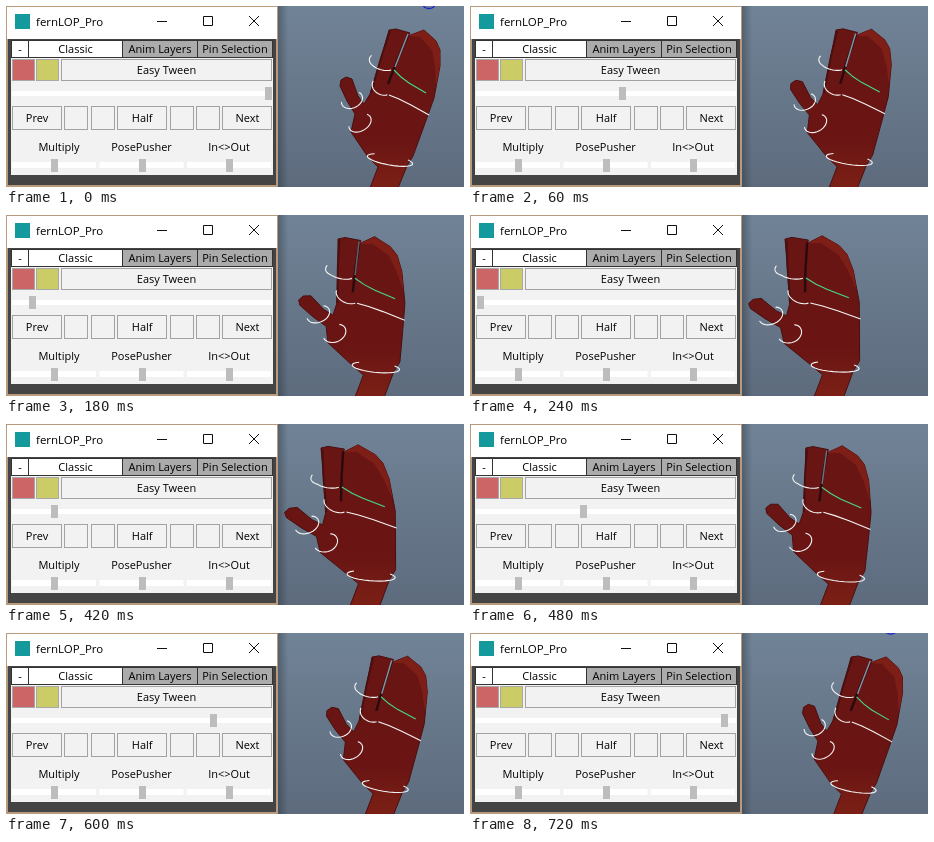
Recreate the animation shown at these times as an HTML page. Size 458x181 px, loop 780 ms.

```html
<!DOCTYPE html>
<html lang="en">
<head>
<meta charset="utf-8">
<title>Tween slider</title>
<style>
  html, body { margin: 0; width: 100%; height: 100%; overflow: hidden; }
  svg { display: block; width: 458px; height: 181px; }
  text { font: 11px "Open Sans", "Noto Sans", sans-serif; }
  .mid { text-anchor: middle; }
  .btn { fill: #f2f2f2; stroke: #a2a2a2; }
  .knob { fill: #bdbdbd; }
  .line { fill: none; stroke: #f4f4f4; stroke-width: 1.1; }
</style>
</head>
<body>
<svg viewBox="0 0 458 181">
  <defs>
    <linearGradient id="sky" x2="0" y2="1">
      <stop stop-color="#718397"/><stop offset="1" stop-color="#5d6b7d"/>
    </linearGradient>
    <linearGradient id="shade">
      <stop stop-opacity=".28"/><stop offset="1" stop-opacity="0"/>
    </linearGradient>
    <linearGradient id="red" x2="0" y2="1">
      <stop stop-color="#681514"/><stop offset=".7" stop-color="#6a1514"/><stop offset="1" stop-color="#7c2015"/>
    </linearGradient>
  </defs>
  <rect x="271" width="187" height="181" fill="url(#sky)"/>
  <rect x="271" width="11" height="181" fill="url(#shade)"/>
  <g id="hand"></g>
  <g id="panel">
    <rect width="272" height="181" fill="#b89a7c"/>
    <rect x="2" y="1" width="268" height="178" fill="#444"/>
    <rect x="1" y="1" width="270" height="32" fill="#fff"/>
    <rect x="9" y="8" width="15" height="15" fill="#149a9c"/>
    <text x="30" y="20" style="font-size:11.5px">fernLOP_Pro</text>
    <path d="M151 15.500h10M197.500 10.500h9v9h-9zM243 10l10 10M253 10l-10 10" fill="none" stroke="#111"/>
    <rect x="5" y="34" width="262" height="135" fill="#f2f2f2"/>
  </g>
  <rect id="knob" class="knob" y="81" width="7" height="13"/>
</svg>
<script>
const NS = "http://www.w3.org/2000/svg";
const [panel, hand, knob] = ["panel", "hand", "knob"].map(id => document.getElementById(id));

function add(parent, tag, attrs, text) {
  const el = document.createElementNS(NS, tag);
  for (const k in attrs) el.setAttribute(k, attrs[k]);
  if (text) el.textContent = text;
  return parent.appendChild(el);
}
const label = (x, y, s) => add(panel, "text", { x, y, class: "mid" }, s);
const box = (x, y, width, height, attrs) =>
  add(panel, "rect", { x: Math.round(x) + .5, y: y + .5, width, height, ...attrs });
function button(x, y, width, height, s) {
  box(x, y, width, height, { class: "btn" });
  label(x + width / 2 + .5, y + height / 2 + 4.5, s);
}
const track = (x, y, width, height) => add(panel, "rect", { x, y, width, height, fill: "#fff" });

let x = 5;
for (const [s, w] of [["-", 17], ["Classic", 94], ["Anim Layers", 75], ["Pin Selection", 75]]) {
  box(x, 34, w, 17, { fill: w === 75 ? "#ababab" : "#fff", stroke: "#333" });
  label(x + w / 2 + .5, 47, s);
  x += w;
}
["#cc6666", "#cccc66"].forEach((fill, i) => box(6 + 24 * i, 53, 22, 21, { fill, stroke: "#a8a8a8" }));
button(55, 53, 210, 21, "Easy Tween");
track(6, 85, 260, 5);
x = 6;
for (const s of ["Prev", "", "", "Half", "", "", "Next"]) {
  const w = s ? 49 : 23;
  button(x, 100, w, 23, s);
  x += w + 3.4;
}
["Multiply", "PosePusher", "In<>Out"].forEach((s, i) => {
  const mid = 49 + 87.5 * i;
  label(i ? mid - 1 : 53, 145, s);
  track(6 + 87.5 * i, 156, 84, 6);
  add(panel, "rect", { x: Math.round(mid - 4), y: 153, width: 7, height: 13, class: "knob" });
});

// The hand is drawn turned (p = 1); warp opens it towards p = 0.
const clamp = v => Math.max(0, Math.min(1, v));
function warp([x, y], p) {
  const thumb = clamp((366 - x) / 28) * clamp((130 - y) / 55);
  const dx = -68 + .06 * (x - 383) + .39 * (Math.min(y, 150) - 24) - 5 * thumb;
  const dy = y < 165 ? -.09 * (x - 383) - .016 * (y - 24) + 11 * thumb : 0;
  return [x + (1 - p) * dx, y + (1 - p) * dy].map(v => +v.toFixed(2));
}

const parts = [];
function part(attrs, points) {
  const pts = points.split(" ").map(s => s.split(",").map(Number));
  parts.push({ el: add(hand, attrs.fill === "none" || attrs.class ? "polyline" : "polygon", attrs), pts });
}
// Part of an ellipse tilted by rot degrees, drawn from one angle to another.
function ring(cx, cy, rx, ry, rot, from, to) {
  const r = Math.PI / 180, c = Math.cos(rot * r), s = Math.sin(rot * r), pts = [];
  for (let i = 0; i <= 20; i++) {
    const a = (from + (to - from) * i / 20) * r, u = rx * Math.cos(a), v = ry * Math.sin(a);
    pts.push([cx + u * c - v * s, cy + u * s + v * c]);
  }
  parts.push({ el: add(hand, "polyline", { class: "line" }), pts });
}

part({ fill: "url(#red)", stroke: "#4a0f0f", "stroke-linejoin": "round" },
  "383,24 390,23 404,27 402,30 418,24 430,35 434,44 434,60 428,92 418,120 407,150 401,160 392,182 " +
  "364,182 372,161 362,151 345,126 349,108 341,95 334,80 335,74 340,71 346,73 352,90 358,98 364,88 375,52");
part({ fill: "#7d1f17" }, "402,30 418,24 430,35 434,44 434,60 430,80 429,60 426,44 414,31");
part({ fill: "none", stroke: "#4a0f0f", "stroke-width": 2 }, "384,25 375,52 365,87");
part({ fill: "none", stroke: "#2a0a0c", "stroke-width": 2.4 }, "402,29 391,55 382,78");
part({ fill: "none", stroke: "#8293a6", "stroke-width": 1.5 }, "402,28 389,61");
const slit = parts[parts.length - 1].el;
part({ fill: "none", stroke: "#46d88a", "stroke-width": 1.1 }, "388,64 395,71 403,77 420,87");
part({ class: "line" }, "383,89 393,93 405,99 423,109");
ring(377, 56, 14, 8, 15, 205, 45);
ring(377, 80, 11, 9, 20, 190, 50);
ring(346, 94, 11, 8, -25, 200, -30);
ring(354, 117, 12, 8, -30, 200, -30);
ring(384, 154, 23, 5, 10, 225, -40);
const mark = add(hand, "ellipse", { rx: 6, ry: 4.5, fill: "none", stroke: "#1626cc", "stroke-width": 1.3 });

function pose(p) {
  for (const { el, pts } of parts) el.setAttribute("points", pts.map(q => warp(q, p)).join(" "));
  slit.setAttribute("opacity", clamp(p * 2.5));
  mark.setAttribute("cx", 423 - 80 * (1 - p));
  mark.setAttribute("cy", -2 - 50 * (1 - p));
}

// Falls for 240 ms, rests, then rises from 420 ms on, in steps of 60 ms.
const STEP = 60, FALL = 240, RISE = 420, LOOP = 780;
const easeOut = u => 1 - (1 - u) ** 2;
function frame(now) {
  const t = Math.floor(now % LOOP / STEP) * STEP;
  if (t < RISE) {
    const u = clamp(t / FALL);
    knob.setAttribute("x", Math.round(259 - 252 * easeOut(u)));
    pose(1 - u);
  } else {
    const e = easeOut((t - RISE) / (LOOP - RISE));
    knob.setAttribute("x", Math.round(45 + 212 * e));
    pose(e);
  }
  requestAnimationFrame(frame);
}
frame(0);
</script>
</body>
</html>
```
